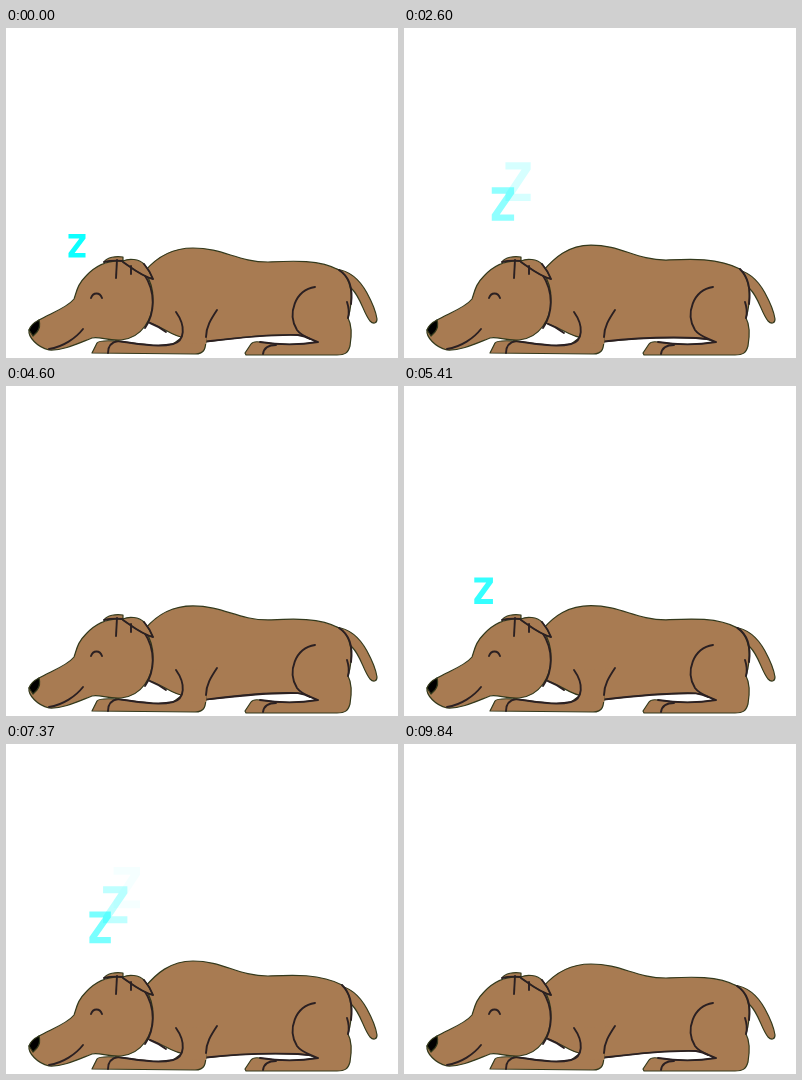
Animation, 392 px wide and 330 px high, one loop 9.87 s. Source, as an HTML page with a canvas:

```html
<!DOCTYPE html>
<html lang="en">
<head>
<meta charset="utf-8">
<title>Sleeping dog</title>
<style>
html, body { margin: 0; width: 100%; height: 100%; overflow: hidden; background: #fff; }
canvas { display: block; }
</style>
</head>
<body>
<canvas id="stage" width="392" height="330"></canvas>
<script>
const ctx = document.getElementById('stage').getContext('2d');
const FUR = '#a87b52', INK = '#2b2022', EDGE = '#33391c', SLEEP = '#00ffff';
const LOOP = 9870, BREATH = 5000, LEAD = 130;
const LETTER_STARTS = [0, 0.55, 1.27], LETTER_LIFE = 2.6;

function stroke(path, color, width) {
  ctx.strokeStyle = color;
  ctx.lineWidth = width;
  ctx.stroke(path);
}

function shape(d, fill = FUR) {
  const path = new Path2D(d);
  ctx.fillStyle = fill;
  ctx.fill(path);
  stroke(path, EDGE, 1.2);
}

function line(d) {
  stroke(new Path2D(d), INK, 1.9);
}

function drawTail() {
  shape('M330 241 C346 243 355 254 361 265 C367 276 370 284 371 291 C371 296 367 296 364 293 C357 284 355 270 346 261 C340 256 335 250 330 248 Z');
}

function drawTorso(b) {
  const back = 220 - 3 * b, mid = 234 - 2 * b, rump = 242 - b;
  const belly = 307 + 3 * b, chest = 293 + b;
  shape(`M139 243 C150 230 164 ${back} 187 ${back}
    C217 ${back} 232 ${mid} 262 ${mid}
    C284 ${mid - 1} 313 ${mid - 3} ${333 + 3 * b} ${rump}
    C346 250 348 270 342 290
    C347 299 345 312 344 318 C342 325 339 327 331 327
    L240 327 L239 325 L245 316 Q247 313 254 314
    C273 317 294 317 312 314
    C303 312 302 ${belly} 292 ${belly}
    C262 ${belly - 1} 230 310 198 314
    L180 310 C165 309 158 ${chest + 5} 138 ${chest} Z`);
  line(`M${333 + 3 * b} ${rump} C344 249 347 261 345 276`);
  line('M309 259 C289 262 281 286 291 302 C296 309 304 310 312 314 C294 317 273 317 254 314');
  line(`M200 313.5 C230 310 262 ${belly - 1} 292 ${belly} Q299 ${belly + 1} 304 311`);
  line('M341 274 Q344 283 342 290');
  line('M257 326 C258 319 263 317 270 317');
  line(`M144 ${chest + 2} Q152 ${chest + 5} 160 ${chest + 11}`);
}

function drawFrontLeg() {
  shape('M200 309 C200 320 199 326 189 326 L86 325 L91 315 Q93 312 110 313 C130 315 150 320 167 316 L178 308 Z');
  const upper = 'M211 282 C205 291 200 299 200 309 L178 308 Q179 297 170 284';
  ctx.fillStyle = FUR;
  ctx.fill(new Path2D(upper + ' Z M178 306 L201 306 L200 316 L172 315 Z'));
  line('M211 282 C205 291 200 299 200 309');
  line('M170 284 C180 298 179 313 167 316 C150 320 130 315 110 313');
  line('M102 325 C102 318 106 314 112 313');
}

function drawHead() {
  shape('M33 292 C43 286 61 280 68 271 C71 263 71 257 80 248 C90 237 102 232 117 233 C137 235 147 252 147 271 C147 291 136 310 115 312 C102 313 93 308 86 310 C73 315 57 323 43 322 C31 319 22 309 23 302 Z');
  line('M138 246 C150 264 149 285 139 300');
  shape('M33 292 Q35 299 31 304 L27 308 L23 302 Q25 296 33 292 Z', '#000');
  line('M43 321 C57 319 70 310 77 301');
  line('M85 270 C87 264 94 264 96 270');
  shape('M98 234 C101 229 110 228 117 229 L117 233 Q107 232 98 234 Z');
  line('M98 234 Q107 232 117 233');
  line('M111 232 L110 250');
  shape('M117 233 C123 230 133 231 138 236 C142 241 145 247 147 251 C137 249 127 241 117 234 Z');
  line('M117 234 C127 241 137 249 147 251 Q144 243 138 236');
  line('M125 238 L125 246');
}

function drawLetter(age) {
  const x = 60 + 19 * age, y = 210.5 - 35 * age;
  const w = 16.5 + 4 * age, h = 22.5 + 7.5 * age;
  const bar = h * 0.19, slant = w * 0.36;
  ctx.globalAlpha = 1 - age / LETTER_LIFE;
  ctx.fillStyle = SLEEP;
  ctx.beginPath();
  [[0, 0], [w, 0], [w, bar], [slant, h - bar], [w, h - bar],
   [w, h], [0, h], [0, h - bar], [w - slant, bar], [0, bar]]
    .forEach(([dx, dy]) => ctx.lineTo(x + dx, y + dy));
  ctx.fill();
  ctx.globalAlpha = 1;
}

function draw(now) {
  const t = (now % LOOP + LEAD) % BREATH;
  const breath = (1 - Math.cos(2 * Math.PI * t / BREATH)) / 2;
  ctx.fillStyle = '#fff';
  ctx.fillRect(0, 0, 392, 330);
  ctx.lineCap = ctx.lineJoin = 'round';

  drawTail();
  drawTorso(breath);
  drawFrontLeg();
  drawHead();
  for (const start of LETTER_STARTS) {
    const age = t / 1000 - start;
    if (age >= 0 && age < LETTER_LIFE) drawLetter(age);
  }
}

const begin = performance.now();
function tick() {
  draw(performance.now() - begin);
  requestAnimationFrame(tick);
}
tick();
</script>
</body>
</html>
```
